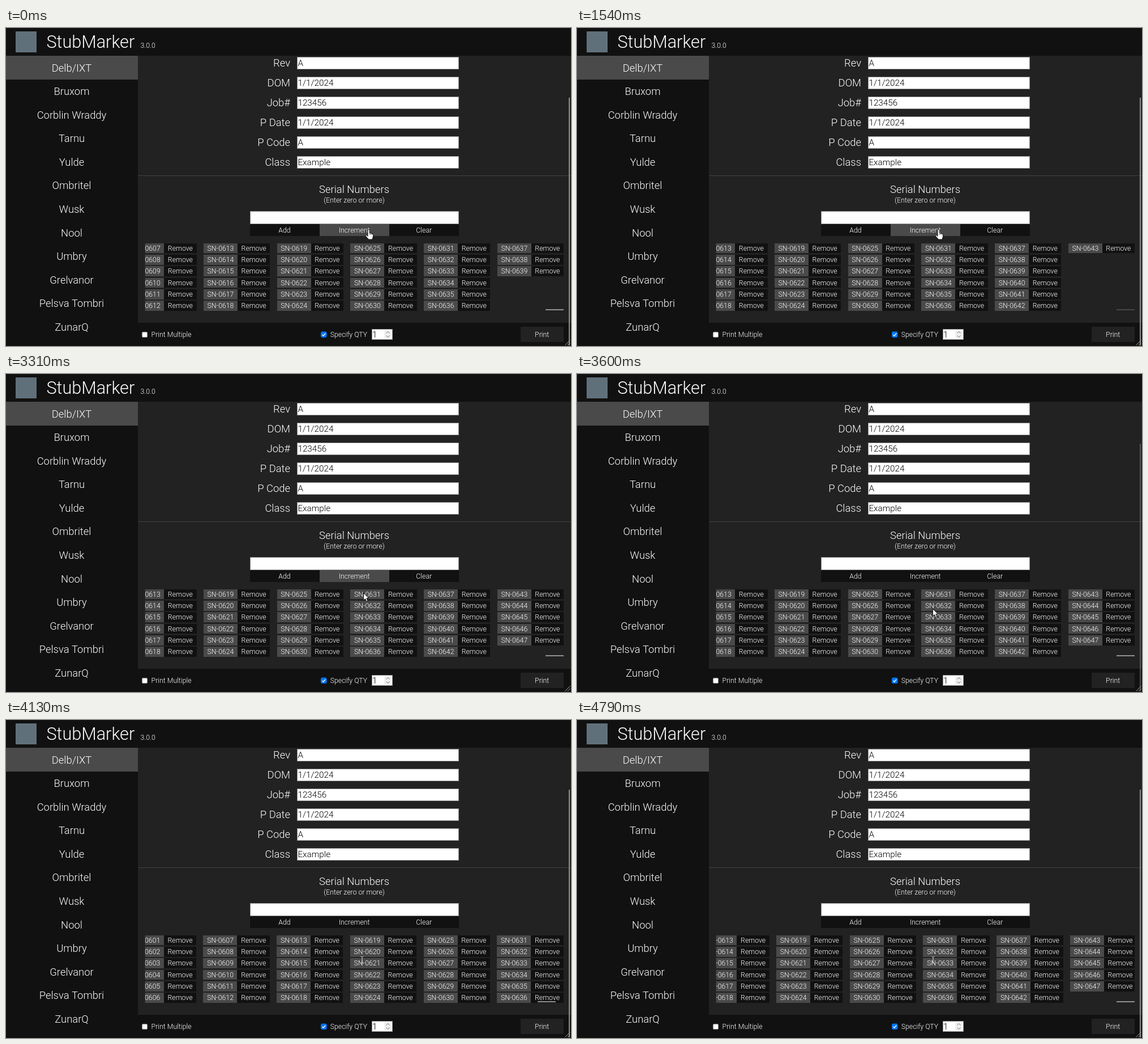
Write an HTML page with a canvas that moves like this. It is 998 by 561 pixels and loops after 4.81 s.

```html
<!DOCTYPE html>
<html lang="en">
<head>
<meta charset="utf-8">
<title>StubMarker</title>
<style>
  html, body { margin: 0; width: 100%; height: 100%; overflow: hidden; background: #222; }
  canvas { display: block; }
</style>
</head>
<body>
<canvas id="stage" width="998" height="561"></canvas>
<script>
const ctx = document.getElementById('stage').getContext('2d');
const LOOP = 4810;
const DARK = '#111', MID = '#222', LIT = '#4a4a4a', INK = '#fff';
const SMALL = 12.3, FIELD = 15.3, LARGE = 18.4, TITLE = 30.6;
const COLUMN = 129.7, ROW = 20.36, PER_COLUMN = 6;

const clients = ['Delb/IXT', 'Bruxom', 'Corblin Wraddy', 'Tarnu', 'Yulde', 'Ombritel',
  'Wusk', 'Nool', 'Umbry', 'Grelvanor', 'Pelsva Tombri', 'ZunarQ'];
const fields = [['Rev', 'A'], ['DOM', '1/1/2024'], ['Job#', '123456'],
  ['P Date', '1/1/2024'], ['P Code', 'A'], ['Class', 'Example']];

// Each track holds [start time, value...] steps.
const serialTrack = [[0, 639], [290, 640], [710, 641], [1110, 642], [1540, 643],
  [1810, 644], [2090, 645], [2370, 646], [2630, 647]];
const scrollTrack = [[0, 0], [3730, 28], [3860, 95.5], [3980, 190], [4130, 259],
  [4260, 225], [4400, 129.7], [4530, 50], [4660, 14], [4790, 3.2]];
const cursorTrack = [[0, 'hand', 634, 355], [150, 'hand', 632, 355], [3310, 'arrow', 631, 386],
  [3470, 'arrow', 630, 399], [3600, 'arrow', 628, 414], [3730, 'arrow', 628, 422],
  [3980, 'beam', 629, 417]];
// Overlay scrollbars fade out when idle and return on scrolling.
const listBarTrack = [[0, 1], [290, 0.5], [430, 0], [1540, 0.35], [1680, 1]];
const pageBarTrack = [[0, 1], [2750, 0.6], [2880, 0.2], [3030, 0], [3600, 0.5], [3730, 1]];

const hand = new Path2D('M5 11V1.9a1.6 1.6 0 0 1 3.2 0V6.6l4.6 1.1q2 .6 1.9 2.6l-.5 4-1.3 3.7H6.6L2 12.9q-1.3-2 .2-2.4T5 12.4Z');
const arrow = new Path2D('M.5 .5V13.2l3-2.8 2.2 5 2.3-1-2.2-4.8h4.1Z');
const beam = new Path2D('M-2.5 .5H-1L0 1.5 1 .5H2.5M0 1.5V11M-2.5 12H-1L0 11 1 12H2.5');

const current = (track, time) => track.findLast(step => step[0] <= time).slice(1);

// Fills a rectangle with its edges snapped to whole pixels.
function box(x, y, w, h, color) {
  const left = Math.round(x), top = Math.round(y);
  ctx.fillStyle = color;
  ctx.fillRect(left, top, Math.round(x + w) - left, Math.round(y + h) - top);
}

// Places text with its capitals centred vertically on midY.
function text(label, x, midY, size, align = 'left', color = INK) {
  ctx.font = `300 ${size}px Roboto, sans-serif`;
  ctx.textAlign = align;
  ctx.fillStyle = color;
  ctx.fillText(label, x, midY + size * 0.356);
}

function line(points, color, width = 1) {
  ctx.beginPath();
  points.forEach(([x, y]) => ctx.lineTo(x, y));
  ctx.strokeStyle = color;
  ctx.lineWidth = width;
  ctx.stroke();
}

function input(x, y, w, h, value = '') {
  box(x, y, w, h, '#8f8f8f');
  box(x + 1, y + 1, w - 2, h - 2, '#fff');
  text(value, x + 1.4, y + h / 2, FIELD, 'left', '#000');
}

function rounded(x, y, size, fill, stroke) {
  ctx.beginPath();
  ctx.roundRect(x, y, size, size, 1.8);
  ctx.fillStyle = fill;
  ctx.fill();
  ctx.strokeStyle = stroke;
  ctx.lineWidth = 1;
  ctx.stroke();
}

function scrollbar(x, y, w, h, opacity) {
  ctx.globalAlpha = opacity;
  box(x, y, w, h, '#909090');
  ctx.globalAlpha = 1;
}

function drawHeader() {
  box(0, 0, 998, 49, DARK);
  box(17, 6, 37, 37, '#60707a');
  text('StubMarker', 71.5, 24.5, TITLE);
  text('3.0.0', 237.5, 31, SMALL);
}

function drawSidebar() {
  box(0, 49, 233, 512, DARK);
  box(0, 49, 233, 41.5, LIT);
  clients.forEach((name, i) => text(name, 116, 70.1 + i * 41.55, LARGE, 'center'));
}

function drawForm(hover) {
  fields.forEach(([label, value], i) => {
    const y = 51 + i * 35;
    text(label, 502, y + 10.4, LARGE, 'right');
    input(514, y, 286, 22, value);
  });
  box(233, 260, 765, 1, '#414141');
  text('Serial Numbers', 615, 284.8, LARGE, 'center');
  text('(Enter zero or more)', 615, 303.4, SMALL, 'center');
  input(431, 323, 369, 23);
  ['Add', 'Increment', 'Clear'].forEach((label, i) => {
    box(430.8 + i * 123.1, 345.5, 123.1, 21.5, hover && i === 1 ? LIT : DARK);
    text(label, 492 + i * 123.1, 356.4, SMALL, 'center');
  });
}

function drawSerials(last, scroll, barOpacity) {
  ctx.save();
  ctx.beginPath();
  ctx.rect(245.7, 375, 739.3, 128);
  ctx.clip();
  const lastColumn = Math.floor((last - 1) / PER_COLUMN);
  for (let n = (lastColumn - 8) * PER_COLUMN + 1; n <= last; n++) {
    const column = Math.floor((n - 1) / PER_COLUMN);
    const x = 867.6 + scroll - (lastColumn - column) * COLUMN;
    const y = 379.6 + ((n - 1) % PER_COLUMN) * ROW;
    box(x, y, 60, 17.6, LIT);
    box(x + 60, y, 57.4, 17.6, DARK);
    text('SN-' + String(n).padStart(4, '0'), x + 30.2, y + 8.7, SMALL, 'center');
    text('Remove', x + 88.8, y + 8.7, SMALL, 'center');
  }
  scrollbar(953 - scroll * 0.054, 495.6, 32, 2, barOpacity);
  ctx.restore();
}

function drawFooter(barOpacity) {
  box(233, 520, 765, 41, DARK);
  rounded(240.3, 536.3, 9.4, '#fff', '#767676');
  text('Print Multiple', 256.6, 540.4, SMALL);
  rounded(556.5, 536, 9.6, '#0075ff', '#0075ff');
  line([[558.6, 541], [560.6, 543.2], [564.3, 538.6]], '#fff', 1.5);
  text('Specify QTY', 572.7, 540.4, SMALL);
  input(645.5, 531, 37.5, 18.5, '1');
  box(668, 533, 13, 14.5, '#efefef');
  line([[671.5, 538.5], [674.5, 535.5], [677.5, 538.5]], '#666');
  line([[671.5, 542.5], [674.5, 545.5], [677.5, 542.5]], '#666');
  box(909, 527, 75.5, 27, MID);
  text('Print', 946.7, 540.4, SMALL, 'center');
  scrollbar(994, 123, 2, 437, barOpacity);
  line([[987.5, 559.5], [996.5, 550.5]], '#aaa');
  line([[992, 559.5], [996.5, 555]], '#aaa');
}

function drawCursor(kind, x, y) {
  ctx.save();
  ctx.translate(x, y);
  ctx.lineJoin = 'round';
  ctx.lineWidth = 1;
  if (kind === 'beam') {
    ctx.strokeStyle = '#ddd';
    ctx.stroke(beam);
  } else {
    const shape = kind === 'hand' ? hand : arrow;
    ctx.fillStyle = '#fff';
    ctx.fill(shape);
    ctx.strokeStyle = '#111';
    ctx.stroke(shape);
    if (kind === 'hand') {
      for (const knuckle of [8.2, 10.5, 12.6]) {
        line([[knuckle, 7.4], [knuckle, 10]], '#222', 0.7);
      }
    }
  }
  ctx.restore();
}

function render(now) {
  const time = now % LOOP;
  const at = track => current(track, time);
  box(0, 0, 998, 561, MID);
  drawForm(time < 3470);
  drawSerials(...at(serialTrack), ...at(scrollTrack), ...at(listBarTrack));
  drawSidebar();
  drawHeader();
  drawFooter(...at(pageBarTrack));
  drawCursor(...at(cursorTrack));
}

function tick() {
  render(performance.now());
  requestAnimationFrame(tick);
}
tick();
</script>
</body>
</html>
```
